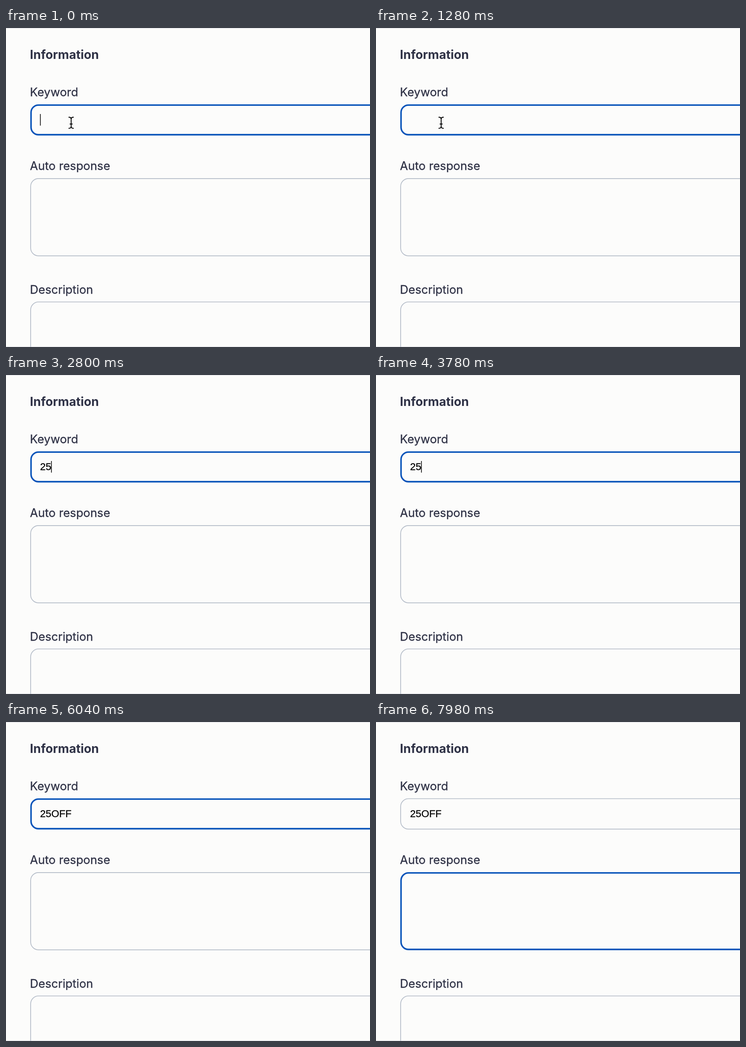
These frames come from a looping animation (799x701 px, 8 s). An HTML page:

```html
<!DOCTYPE html>
<html lang="en">
<head>
<meta charset="utf-8">
<title>Keyword form</title>
<style>
  html, body { margin: 0; width: 100%; height: 100%; overflow: hidden; background: #fcfcfb; }
  svg { display: block; width: 100%; height: 100%; }
  text { stroke-width: .3px; }
  .label { font: 400 25.65px Inter, "Noto Sans", sans-serif; fill: #2e3145; stroke: #2e3145; }
  .title { font: 700 26.67px Inter, "Noto Sans", sans-serif; fill: #2e3145; }
  .value { font: 22.22px "Liberation Sans", Arial, sans-serif; fill: #000; stroke: #000; }
  .box { fill: none; }
  .edge { stroke: #dcdce4; }
</style>
</head>
<body>
<svg viewBox="0 0 799 701">
  <rect width="799" height="701" fill="#fcfcfb"/>
  <path class="edge" d="M0 .5H799M0 700.5H799"/>
  <text class="title" x="52.6" y="68">Information</text>
  <text class="label" x="52.6" y="150">Keyword</text>
  <text class="label" x="52.6" y="312">Auto response</text>
  <text class="label" x="52.6" y="584">Description</text>
  <rect class="box" id="keyword"/>
  <rect class="box" id="reply"/>
  <rect class="box" id="about"/>
  <text class="value" id="value" x="74.7" y="209"></text>
  <rect id="caret" width="1.5" height="25.5"/>
  <g id="pointer" fill="none" stroke-linecap="round">
    <path id="halo" stroke="#fff" stroke-width="4.6"/>
    <path id="beam" stroke="#000" stroke-width="1.9"/>
  </g>
</svg>
<script>
const LOOP = 8000, BLINK = 500, TAB = 6240;
const WORD = "25OFF";
const keys = [2540, 2700, 4440, 5260, 5540];
const $ = id => document.getElementById(id);
const value = $("value"), caret = $("caret");

const ibeam = "M138 196Q143 196 143 200.5Q143 196 148 196" +
  "M143 200V216M138 220.5Q143 220.5 143 216Q143 220.5 148 220.5M140.6 211H145.4";
$("halo").setAttribute("d", ibeam);
$("beam").setAttribute("d", ibeam);

function set(el, attrs) {
  for (const k in attrs) el.setAttribute(k, attrs[k]);
}

// Borders lie inside the field's outer edge.
function field(id, top, bottom, focused) {
  const w = focused ? 3.33 : 1.67;
  set($(id), {
    x: 53.3 + w / 2, y: top + w / 2, width: 900, height: bottom - top - w,
    rx: 18 - w / 2, "stroke-width": w, stroke: focused ? "#0753b9" : "#b4bcc8"
  });
}

function draw(t) {
  const typed = keys.filter(k => t >= k).length;
  const tabbed = t >= TAB;
  const text = WORD.slice(0, typed);
  if (value.textContent !== text) value.textContent = text;

  field("keyword", 167.7, 236.2, !tabbed);
  field("reply", 330, 501.4, tabbed);
  field("about", 601.2, 775, false);

  // Each key press restarts the blink.
  const since = tabbed ? t - TAB : typed ? t - keys[typed - 1] : t + 300;
  const width = tabbed || !typed ? 0 : value.getComputedTextLength();
  set(caret, {
    x: 74.7 + width - (width ? .5 : 0), y: tabbed ? 351.3 : 189,
    visibility: since % (2 * BLINK) < BLINK ? "visible" : "hidden"
  });
  $("pointer").setAttribute("visibility", typed ? "hidden" : "visible");
}

const start = performance.now();
function tick() {
  draw((performance.now() - start) % LOOP);
  requestAnimationFrame(tick);
}
tick();
</script>
</body>
</html>
```
